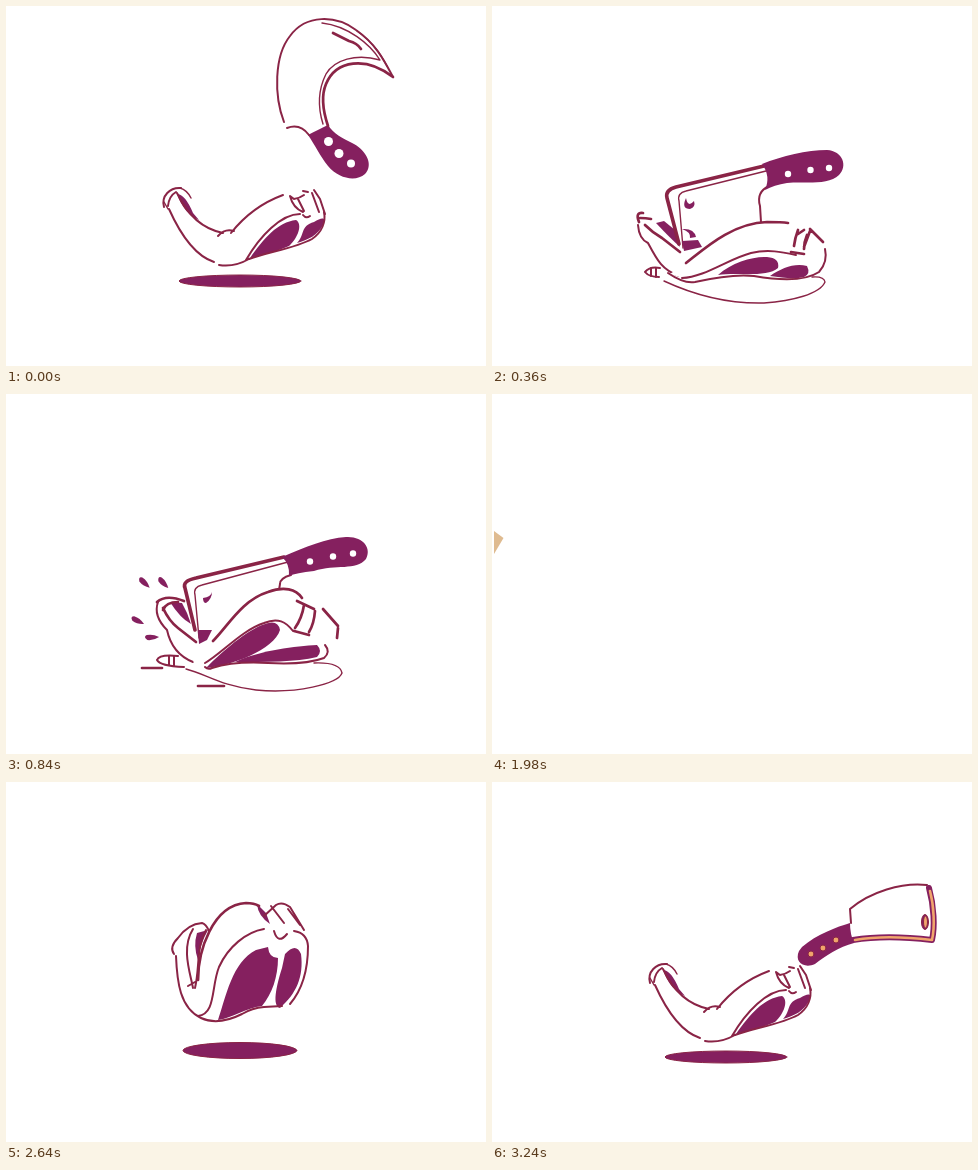
An HTML page with a canvas that plays this animation: 480 px wide and 360 px high, repeating every 3.3 s.

```html
<!DOCTYPE html>
<html>
<head>
<meta charset="utf-8">
<style>
html, body { margin: 0; width: 100%; height: 100%; overflow: hidden; background: #fff; }
canvas { display: block; }
</style>
</head>
<body>
<canvas id="stage" width="480" height="360"></canvas>
<script>
const ctx = document.getElementById('stage').getContext('2d');
const PLUM = '#85205f', LINE = '#8a2446', TAN = '#f0a56c', STEP = 60, LOOP = 3300;

// Parts are [kind, path]; ellipse kinds take "cx cy rx ry".
const fills = { fill: PLUM, white: '#fff', tan: TAN };
const ellipses = { disc: PLUM, hole: '#fff', dot: TAN };
const strokes = {
  line: [LINE, 2], bold: [LINE, 2.7], spine: [LINE, 3.6], thin: [LINE, 1.4], edge: [PLUM, 6], glow: [TAN, 2.6]
};

function draw(parts) {
  for (const [kind, d] of parts) {
    if (ellipses[kind]) {
      const [x, y, rx, ry] = d.split(' ').map(Number);
      ctx.beginPath();
      ctx.ellipse(x, y, rx, ry, 0, 0, 7);
      ctx.fillStyle = ellipses[kind];
      ctx.fill();
      if (kind !== 'hole') {
        ctx.strokeStyle = LINE;
        ctx.lineWidth = 1;
        ctx.stroke();
      }
    } else if (fills[kind]) {
      ctx.fillStyle = fills[kind];
      ctx.fill(new Path2D(d));
    } else {
      [ctx.strokeStyle, ctx.lineWidth] = strokes[kind];
      ctx.stroke(new Path2D(d));
    }
  }
}

// Draw parts scaled about a point and shifted down.
function place(parts, x, y, sx, sy, dy = 0) {
  ctx.save();
  ctx.translate(x, y + dy);
  ctx.scale(sx, sy);
  ctx.translate(-x, -y);
  draw(parts);
  ctx.restore();
}

function mix(a, b, k) {
  const to = b.match(/-?[\d.]+/g);
  let i = 0;
  return a.replace(/-?[\d.]+/g, n => (+n + (to[i++] - n) * k).toFixed(2));
}

const hover = [
  ['fill', 'M171 188Q179 188 187 207L193 214Q178 208 171 188Z'],
  ['fill', 'M244 252C258 232 272 216 290 214C297 218 292 232 283 240C270 246 256 249 244 252Z'],
  ['fill', 'M291 237C299 229 294 220 308 216C316 211 321 211 317 219C312 229 302 234 291 237Z'],
  ['line', 'M158 201C155 190 164 181 175 182M162 200Q163 190 170 186'],
  ['thin', 'M174 182Q181 184 185 192M158 196L162 203'],
  ['line', 'M163 203C176 232 190 250 208 256M213 259C225 261 236 257 243 253'],
  ['line', 'M171 187C178 202 192 222 217 227M212 230Q219 222 228 225M225 227C240 208 258 196 277 189'],
  ['line', 'M240 254C254 230 275 208 294 208M243 253C262 246 290 242 306 233C316 226 320 216 318 206'],
  ['line', 'M284 190L288 193Q294 192 298 189M284 190Q287 202 297 206M292 193L298 205M297 185L302 186M308 184L314 193L319 208M306 187L313 206M297 209Q300 213 304 210']
];

const curled = [
  ['fill', 'M191 151L202 148Q194 162 192 178Q187 164 191 151Z'],
  ['fill', 'M212 238C220 215 226 180 250 168L262 165Q263 176 272 176C272 195 266 212 256 224C240 226 226 236 212 238Z'],
  ['fill', 'M274 226C266 224 270 205 276 186L279 172Q290 160 295 172C298 195 290 212 274 226Z'],
  ['fill', 'M251 122Q252 134 264 142L260 131Z'],
  ['line', 'M168 172Q163 165 172 156Q182 142 196 141Q200 142 203 149'],
  ['line', 'M170 174C171 200 174 226 195 236C208 242 222 239 236 232Q246 226 258 225L276 224'],
  ['line', 'M187 147C175 166 184 190 187 206M200 148C190 165 194 185 189 206M182 204L189 200'],
  ['bold', 'M192 198C192 170 206 123 240 121Q248 121 253 124'],
  ['line', 'M192 234C210 232 205 205 213 185C222 165 240 150 258 147'],
  ['line', 'M258 134L270 123Q276 119 284 125L298 148M265 124L278 141M282 127L294 143M268 149Q272 163 281 152'],
  ['line', 'M288 149Q301 151 302 164C302 190 296 208 284 222']
];

const flat = [
  ['white', 'M143 213C180 206 210 205 232 217C260 232 275 254 308 261L317 284Q300 285 285 281C245 275 225 240 195 233L161 230L142 238Z'],
  ['fill', 'M161 239L166 232Q178 228 192 233Q176 238 161 239Z'],
  ['fill', 'M254 224C275 227 302 238 308 245L306 252C285 254 270 242 254 224Z'],
  ['fill', 'M268 224C290 223 317 230 322 241L314 245C301 239 300 231 268 224Z'],
  ['line', 'M146 212C180 206 210 205 232 217C260 232 275 254 308 261'],
  ['line', 'M152 211Q141 210 141 225L142 238M145 237Q150 232 162 230Q180 228 195 233C225 240 245 275 285 281Q300 285 317 283'],
  ['line', 'M232 218C260 226 300 218 327 237'],
  ['thin', 'M147 243h5M156 244h12M174 242h10M180 242l6 -2M145 216L158 211'],
  ['line', 'M328 238Q325 242 327 246M335 246Q337 260 335 271L328 273M317 264V284'],
  ['thin', 'M314 253L328 250M317 253L316 261M326 250L324 270M330 252V272']
];

const raised = [
  ['fill', 'M310 165C325 152 345 145 358 141Q358 152 362 161C347 165 333 174 323 182C312 187 302 180 307 169Z'],
  ['dot', '319 172 3 3'], ['dot', '331 166 3 3'], ['dot', '344 158 3 3'],
  ['line', 'M359 141L358 127C378 110 410 100 435 103'],
  ['edge', 'M361 158C385 154 415 155 440 158C443 145 442 124 437 106'],
  ['glow', 'M363 158C385 154 415 155 440 158C443 145 442 124 438 109'],
  ['disc', '433 140 3.5 7.5'], ['dot', '433.5 140 2 6']
];

const swung = [
  ['fill', 'M302 129C309 125 316 122 322 119C328 128 336 132 348 138C362 146 367 160 359 168C350 176 333 173 322 160C314 150 309 139 302 129Z'],
  ['hole', '322.5 135.5 4.5 4.5'], ['hole', '333 147.5 4.5 4.5'], ['hole', '345 157.5 4 4'],
  ['line', 'M278 116C268 90 268 50 284 30C300 8 330 9 350 24C370 38 378 54 387 71'],
  ['bold', 'M387 71C360 50 330 54 320 78C314 92 318 108 322 120'],
  ['thin', 'M316 17C342 20 364 38 374 54C350 47 328 54 320 68C312 84 312 102 317 118'],
  ['line', 'M281 122Q294 117 303 129'],
  ['bold', 'M327 27L343 35Q351 37 355 43'],
  ['thin', 'M351 25C368 37 375 49 381 60']
];

// Chop parts hold two poses: sunk and swollen.
const chop = [
  ['fill', 'M164 217L172 215L183 224L188 241Q177 231 164 217Z', 'M164 208L176 209L181 219L185 230Q174 224 164 208Z'],
  ['line', 'M146 219Q147 233 156 237C165 254 170 264 187 270', 'M152 208Q147 222 161 236C164 250 172 262 187 268'],
  ['bold', 'M147 216Q143 206 151 207M148 212Q154 212 159 213M153 219Q161 227 170 232L188 246', 'M151 208Q160 200 178 207M157 216Q160 208 172 208M157 214Q163 227 172 234L190 248'],
  ['white', 'M272 159L184 181Q173 184 175 192L189 242L269 224L273 184Z', 'M278 162L190 183Q176 186 178 193L191 244L274 204L283 182Z'],
  ['spine', 'M272 160L184 181Q173 184 175 192L187 238', 'M278 163L190 184Q176 187 179 194L189 236'],
  ['thin', 'M274 165L194 185Q185 187 187 195L191 242', 'M282 168L196 191Q187 193 189 201L193 244'],
  ['line', 'M277 180Q264 186 268 200L269 216', 'M285 181Q274 184 274 190L273 196'],
  ['fill', 'M270 158C290 150 315 144 335 144C351 145 356 160 347 169C336 180 312 175 295 177Q282 179 273 184Q279 170 270 158Z', 'M276 163C300 153 320 144 340 143C357 142 366 154 360 165C350 177 330 170 308 177Q290 179 283 182Q284 170 276 163Z'],
  ['hole', '296 168 3.2 3.2', '304 167.5 3.2 3.2'],
  ['hole', '318.5 164 3.2 3.2', '327 162.5 3.2 3.2'],
  ['hole', '337 162 3.2 3.2', '347 159.5 3.2 3.2'],
  ['fill', 'M194 192Q189 203 198 203Q204 201 202 195Q196 202 194 192Z', 'M206 198Q205 203 197 204Q197 209 200 209Q206 205 206 198Z'],
  ['fill', 'M190 235L206 234L210 241L192 245Z', 'M192 236L206 236L201 246L193 250Z'],
  ['fill', 'M190 223Q202 222 204 231L198 232Q199 226 190 223Z', 'M193 240Q200 238 202 240L198 242Q196 240 193 240Z'],
  ['white', 'M194 257C212 243 240 217 275 216C285 215 290 216 298 219L332 236L327 266L203 276L178 268Z', 'M207 247C222 232 236 206 262 198C278 192 290 194 298 206L332 232L318 264L203 276L187 268Z'],
  ['thin', 'M172 275C200 288 235 298 272 297C300 295 328 288 333 276Q332 270 320 271', 'M180 275C200 280 215 292 250 296C290 300 332 290 336 279Q334 268 308 269'],
  ['fill', 'M226 269C240 256 262 250 275 251Q288 252 286 262C275 272 245 266 226 269Z', 'M200 274C212 262 235 240 256 231Q272 224 274 236C268 256 225 272 200 274Z'],
  ['fill', 'M278 270C290 262 302 257 315 260Q319 268 312 271C300 274 290 271 278 270Z', 'M229 268C255 256 290 252 311 251Q317 257 311 263C290 268 260 268 229 268Z'],
  ['bold', 'M194 257C212 243 240 217 275 216C285 216 290 216 296 217', 'M207 247C222 232 236 206 262 198C278 192 290 195 296 204'],
  ['line', 'M190 272C213 271 236 253 259 247C276 243 290 246 304 249', 'M199 269C215 260 236 236 258 229C272 223 280 228 287 237'],
  ['line', 'M176 267Q192 278 203 276C225 271 245 268 262 270C285 274 312 276 327 266Q336 256 333 243', 'M199 273Q202 276 206 274C225 268 245 268 262 269C280 270 302 270 318 264Q325 258 319 251'],
  ['bold', 'M306 224Q303 232 302 240M306 228L312 224M299 246L312 248M315 229Q312 236 312 243M318 223L331 236M318 225L312 241', 'M298 211Q296 224 289 234M291 207L308 215M288 237L303 241M309 217Q308 230 303 238M317 215L332 232M332 234Q331 244 326 254M310 243L325 254'],
  ['line', 'M153 266Q158 260 168 262M153 266Q157 271 167 271', 'M151 266Q153 260 172 262M151 266Q154 272 178 273'],
  ['line', 'M159 262V270M164 262V271', 'M163 262V271M168 262V272']
];

const splash = [[138, 188, 38], [157, 188, 42], [131, 226, 22], [145, 243, -8]];

function drops(k) {
  for (const [x, y, turn] of splash) {
    ctx.save();
    ctx.translate(185 + (x - 185) * k, 230 + (y - 230) * k);
    ctx.rotate(turn * Math.PI / 180);
    draw([['fill', 'M8 1Q2 4 -4 2.5Q-8 -1 -4 -2.5Q2 -3 8 1Z']]);
    ctx.restore();
  }
  draw([['bold', `M156 274h${-20 * k}M192 292h${26 * k}`]]);
}

const shadow = (y, rx, ry, x = 234) => draw([['disc', `${x} ${y} ${rx} ${ry}`]]);

function chopScene(t) {
  const p = Math.max(0, (360 - t) / 300);
  const e = Math.min(1, Math.max(0, (t - 360) / 480));
  const k = p ? 0.6 * p * Math.sin(p * 2 * Math.PI) : 1 - (1 - e) ** 2 * Math.cos(e * 3 * Math.PI);
  place(chop.map(([kind, a, b]) => [kind, mix(a, b, k)]), 245, 270, 1 + 0.06 * p, 1 - 0.1 * p);
  if (t >= 600) drops(0.5 + 0.5 * Math.min(1, (t - 600) / 240));
}

function fallScene(t) {
  const p = Math.max(0, (2640 - t) / 240);
  if (t <= 2640) {
    shadow(268.5, 57 - 25 * p, 8 - 4 * p);
    place(curled, 234, 240, 1 - 0.1 * p, 1 + 0.15 * p, -190 * (1 - (1 - p) ** 2));
    return;
  }
  const q = Math.max(0, (2880 - t) / 180);
  shadow(275, 59 + 8 * q, 8, 236);
  place(flat, 236, 284, 1 + 0.07 * q, 1 - 0.2 * q);
}

function leapScene(t) {
  const p = (t - 3000) / 240;
  if (p < 0.25) {
    shadow(275, 60, 8, 236);
    place(flat, 236, 284, 0.95, 1.12);
    return;
  }
  shadow(275, 61, 6);
  place(hover, 240, 260, 1, 1, 12 * (1 - p) * Math.cos(p * 2 * Math.PI));
  const s = Math.max(0, p * 2 - 1);
  if (s) place(raised, 308, 180, s, s);
}

function render(t) {
  ctx.fillStyle = '#fff';
  ctx.fillRect(0, 0, 480, 360);
  ctx.lineCap = ctx.lineJoin = 'round';
  if (t < 60) {
    shadow(275, 61, 6);
    draw(hover);
    draw(swung);
  } else if (t < 1980) {
    chopScene(t);
  } else if (t < 2400) {
    ctx.fillStyle = '#dfbb90';
    ctx.fill(new Path2D('M2 137L11.5 144L2 160Z'));
  } else if (t < 3000) {
    fallScene(t);
  } else {
    leapScene(t);
  }
}

const start = performance.now();
function tick() {
  const t = (performance.now() - start) % LOOP;
  render(Math.floor(t / STEP) * STEP);
  requestAnimationFrame(tick);
}
tick();
</script>
</body>
</html>
```
